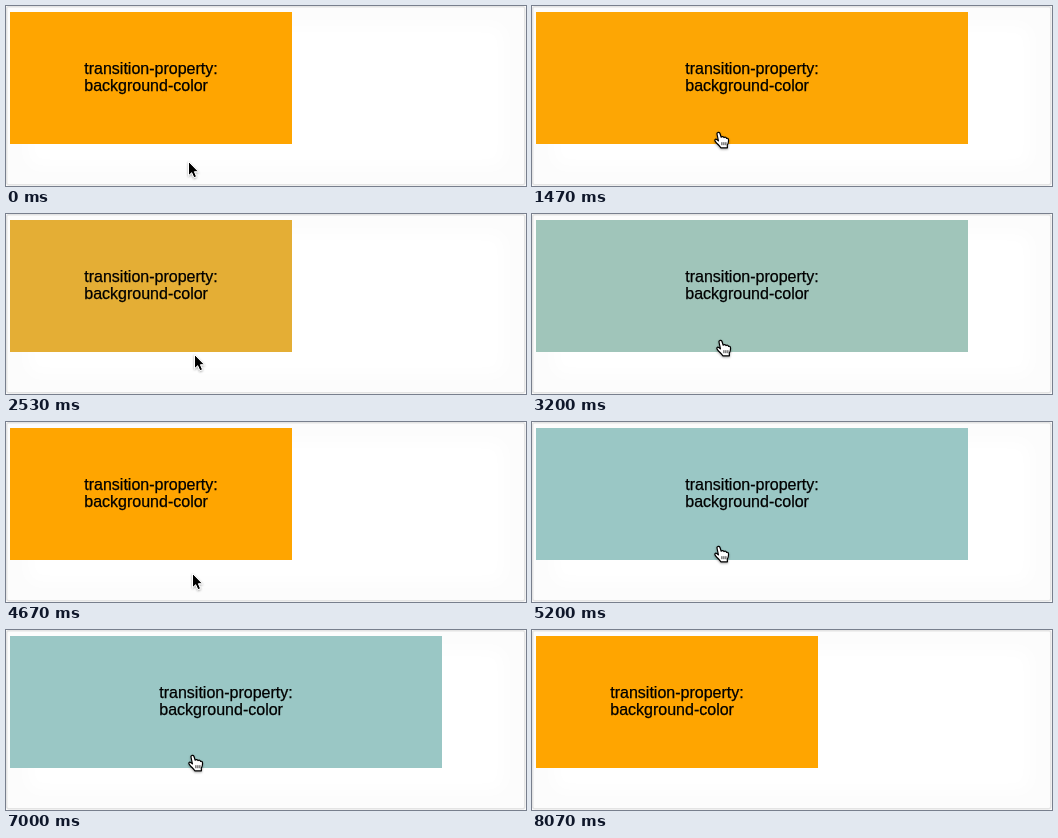
Recreate the animation shown at these times as an HTML page. Size 520 by 180 pixels, loop 8870 ms.

```html
<!DOCTYPE html>
<html lang="en">
<head>
<meta charset="utf-8">
<title>transition-property</title>
<style>
  html, body { margin: 0; width: 100%; height: 100%; overflow: hidden; background: #fff; }
  svg { display: block; width: 520px; height: 180px; }
  text { font: 16px "Liberation Sans", Arial, sans-serif; stroke: #000; stroke-width: .25px; }
</style>
</head>
<body>
<svg viewBox="0 0 520 180">
  <defs>
    <filter id="soft" x="-10%" y="-20%" width="120%" height="140%"><feGaussianBlur stdDeviation="7"/></filter>
    <filter id="shadow" x="-50%" y="-50%" width="200%" height="200%">
      <feDropShadow dx="0" dy="1" stdDeviation="1" flood-color="#000" flood-opacity=".35"/>
    </filter>
  </defs>
  <rect width="520" height="180" fill="#fcfcfc"/>
  <rect x="22" y="20" width="476" height="140" rx="12" fill="#fff" filter="url(#soft)"/>
  <rect x=".75" y=".75" width="518" height="178" rx="2" fill="none" stroke="#e4e4e4" stroke-width="1.5"/>
  <rect id="box" x="4" y="6" height="132"/>
  <g id="label">
    <text y="68">transition-property:</text>
    <text y="85">background-color</text>
  </g>
  <g id="cursor" filter="url(#shadow)" stroke-linejoin="round">
    <path id="arrow" d="M-.5 -.5V13.7L2.7 10.7L4.9 15.7L7.5 14.6L5.4 9.7H9.5Z" stroke="#fff"/>
    <g id="hand" transform="translate(-1 -1)">
      <path d="M-2 2C-2.3 .2 .3 -.4 .9 1.3L2.2 5.2C3 4.2 4.6 4.4 5 5.6C6 4.8 7.2 5.2 7.5 6.4C8.6 5.9 9.4 6.6 9.5 7.8C9.7 10 9.3 11.6 8.3 13.2L8.4 15.8H1.8C.6 13.6 -1.6 12.2 -3.4 9.8C-5 7.8 -3.6 6.6 -2.2 7.6L-.6 8.9Z" fill="#fff" stroke="#000" stroke-width="1.2"/>
      <path d="M2.9 10.2V13.2M4.9 10.2V13.2M6.9 10.2V13.2" stroke="#000" stroke-width=".8"/>
    </g>
  </g>
</svg>
<script>
const LOOP = 8870, STEP = 1000 / 15, FADE = 500;
const ORANGE = [255, 165, 0], SKY = [135, 206, 235];

// The pointer enters and leaves the box in turn, then rests at x, y
const home = { x: 183, y: 156 };
const moves = [
  { at: 1450, x: 188, y: 125 }, { at: 2297, x: 189, y: 141 },
  { at: 2955, x: 190, y: 127 }, { at: 4130, x: 187, y: 152 },
  { at: 4930, x: 188, y: 125 }, { at: 5935, x: 187, y: 149 },
  { at: 6730, x: 188, y: 126 }, { at: 7450, x: 186, y: 190 }
];

const [box, label, cursor, arrow, hand] =
  ["box", "label", "cursor", "arrow", "hand"].map(id => document.getElementById(id));

const mix = (a, b, k) => a + (b - a) * k;
const clamp = k => Math.min(1, Math.max(0, k));
const smooth = k => k * k * (3 - 2 * k);
const bezier = (a, b, u) => 3 * a * u * (1 - u) ** 2 + 3 * b * u * u * (1 - u) + u ** 3;

// CSS "ease": cubic-bezier(.25, .1, .25, 1)
function ease(x) {
  if (x >= 1) return 1;
  let lo = 0, hi = 1;
  for (let i = 0; i < 20; i++) {
    const mid = (lo + hi) / 2;
    if (bezier(.25, .25, mid) < x) lo = mid; else hi = mid;
  }
  return bezier(.1, 1, lo);
}

// Each move starts 200 ms before the box reacts and lasts 260 ms
function pointer(t) {
  return moves.reduce((p, m) => {
    const k = smooth(clamp((t - m.at + 200) / 260));
    return { x: mix(p.x, m.x, k), y: mix(p.y, m.y, k) };
  }, home);
}

function draw(t) {
  const count = moves.filter(m => m.at <= t).length;
  const over = count % 2 === 1;
  const done = count ? ease((t - moves[count - 1].at) / FADE) : 1;
  const blue = over ? done : 1 - done;
  const color = ORANGE.map((c, i) => Math.round(mix(c, SKY[i], blue)));
  const { x, y } = pointer(t);

  box.setAttribute("width", over ? 432 : 282);
  box.setAttribute("fill", `rgb(${color})`);
  label.setAttribute("transform", `translate(${over ? 153.3 : 78.3} 0)`);
  cursor.setAttribute("transform", `translate(${Math.round(x)} ${Math.round(y)})`);
  arrow.style.display = over ? "none" : "";
  hand.style.display = over ? "" : "none";
}

const start = performance.now();
function tick() {
  const t = (performance.now() - start) % LOOP;
  draw(Math.floor((t + 5) / STEP) * STEP);
  requestAnimationFrame(tick);
}
tick();
</script>
</body>
</html>
```
